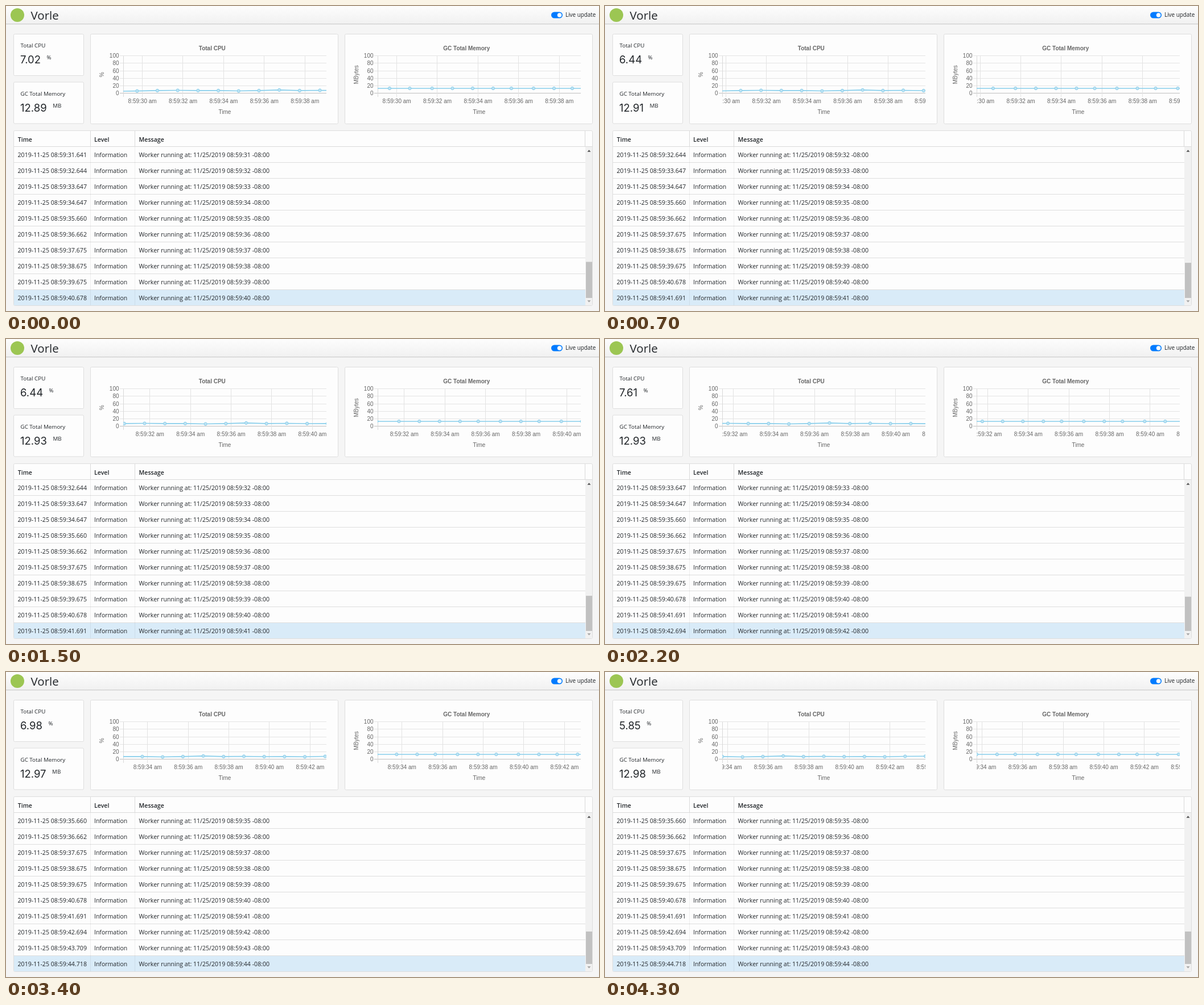
An HTML page with a canvas for the animation above (4400 ms loop, 1042x537 px).

```html
<!DOCTYPE html>
<html lang="en">
<head>
<meta charset="utf-8">
<title>Dashboard</title>
<style>
  html, body { margin: 0; width: 100%; height: 100%; overflow: hidden; background: #f5f5f5; }
  canvas { display: block; }
</style>
</head>
<body>
<canvas id="stage" width="1042" height="537"></canvas>
<script>
const ctx = document.getElementById('stage').getContext('2d');
const LOOP = 4400, STEP = 100;
const UI = '"Open Sans", "Noto Sans", sans-serif';
const CHART = '"Liberation Sans", Arial, sans-serif';

// Chart scroll distance as [time, pixels]
const SCROLL = [[0, 0], [700, 27.5], [1500, 58.2], [2200, 85.7], [2700, 106.3], [3400, 133.6], [4300, 167.1]];
const CPU_TEXT = [[0, '7.02'], [700, '6.44'], [1600, '7.61'], [2500, '7.88'], [3400, '6.98'], [4300, '5.85']];
const MEMORY_TEXT = [[0, '12.89'], [600, '12.91'], [1500, '12.93'], [2500, '12.95'], [3400, '12.97'], [4300, '12.98']];
const LOG_TIMES = [700, 1600, 2500, 3400];
const FIRST_SECOND = 31;
const LOG_MS = [641, 644, 647, 647, 660, 662, 675, 675, 675, 678, 691, 694, 709, 718];

const CPU_POINTS = [5.2, 5.9, 7, 7.6, 7.1, 7.1, 6, 7, 8.6, 7, 7.7, 6.9, 7.02, 6.44, 7.61, 7.88, 6.98]
  .map((value, i) => [194.6 + 35.7 * i, value]);
const MEMORY_POINTS = [638, 674, 709.5, 748.7, 784.5, 820, 856, 888, 927, 963, 995, 1034, 1070, 1102, 1138, 1175, 1210]
  .map(x => [x, 12.9]);

function rect(x, y, w, h, color) {
  ctx.fillStyle = color;
  ctx.fillRect(x, y, w, h);
}

function text(str, x, y, size, { color = '#212529', weight = 400, family = UI, align = 'left' } = {}) {
  ctx.font = `${weight} ${size}px ${family}`;
  ctx.fillStyle = color;
  ctx.textAlign = align;
  ctx.fillText(str, x, y);
  return ctx.measureText(str).width;
}

function chartText(str, x, y, align = 'center', weight = 400) {
  text(str, x, y, 10, { color: '#666', family: CHART, align, weight });
}

function circle(x, y, r, fill) {
  ctx.beginPath();
  ctx.arc(x, y, r, 0, Math.PI * 2);
  ctx.fillStyle = fill;
  ctx.fill();
}

function clipped(x, y, w, h, draw) {
  ctx.save();
  ctx.beginPath();
  ctx.rect(x, y, w, h);
  ctx.clip();
  draw();
  ctx.restore();
}

function card(x, y, w, h) {
  ctx.beginPath();
  ctx.roundRect(x + 0.5, y + 0.5, w - 1, h - 1, 2);
  ctx.fillStyle = '#fdfdfd';
  ctx.fill();
  ctx.strokeStyle = '#dedede';
  ctx.lineWidth = 1;
  ctx.stroke();
}

function scrollAt(t) {
  const i = Math.max(1, SCROLL.findIndex(([time]) => time >= t));
  const [t0, x0] = SCROLL[i - 1], [t1, x1] = SCROLL[i];
  return x0 + (x1 - x0) * (t - t0) / (t1 - t0);
}

const valueAt = (steps, t) => steps.filter(([time]) => time <= t).pop()[1];

function drawHeader() {
  const shade = ctx.createLinearGradient(0, 0, 0, 31);
  shade.addColorStop(0, '#fdfdfd');
  shade.addColorStop(1, '#f1f1f1');
  rect(0, 0, 1042, 31, shade);
  rect(0, 31, 1042, 1, '#cfcfcf');
  rect(0, 32, 1042, 1, '#e9e9e9');
  circle(20, 16, 12, '#9cc653');
  text('Vorle', 43.5, 24, 20.5, { weight: 500 });

  ctx.beginPath();
  ctx.roundRect(958, 10.5, 20, 11, 5.5);
  ctx.fillStyle = '#007bff';
  ctx.fill();
  circle(972.6, 16, 3.8, '#fff');
  text('Live update', 983, 19.3, 9.9);
}

function drawMetric(y, label, value, unit) {
  card(13, y, 124, 74);
  text(label, 25.5, y + 24, 9.8);
  const width = text(value, 25, y + 52, 18.5, { family: 'Inter, sans-serif' });
  text(unit, 25 + width + 10.5, y + 45, 9.8);
}

function drawChart(x, title, unit, points, scroll) {
  const left = x + 58, right = x + 415, top = 88, bottom = 153.5;
  const yOf = value => bottom - value * 0.657;
  card(x, 49, 436, 159);
  chartText(title, x + 214.3, 77.5, 'center', 700);
  chartText('Time', x + 236.5, 189.5);

  ctx.save();
  ctx.translate(x + 20.5, 120.8);
  ctx.rotate(-Math.PI / 2);
  chartText(unit, 0, 3.5);
  ctx.restore();

  for (let value = 0; value <= 100; value += 20) {
    const y = Math.round(yOf(value) - 0.5);
    rect(left - 6, y, right - left + 6, 1, value ? '#e5e5e5' : '#bfbfbf');
    chartText(value, left - 7.5, y + 4, 'right');
  }
  rect(left, top, 1, 72, '#d8d8d8');

  clipped(left, 80, right - left, 95, () => {
    for (let second = 28; second <= 46; second += 2) {
      const tick = x + 91.6 + (second - 30) * 35.7 - scroll;
      if (tick >= left && tick <= right) rect(Math.round(tick - 0.6), top, 1, 72, '#e3e3e3');
      chartText(`8:59:${second} am`, tick, 170.5);
    }
    ctx.beginPath();
    points.forEach(([px, value]) => ctx.lineTo(px - scroll, yOf(value)));
    ctx.strokeStyle = '#87ceeb';
    ctx.lineWidth = 1.6;
    ctx.lineJoin = 'round';
    ctx.stroke();
    ctx.lineWidth = 1;
    for (const [px, value] of points) {
      circle(px - scroll, yOf(value), 2.6, '#bfe3f3');
      ctx.stroke();
    }
  });
}

function drawArrow(y, dir, color) {
  ctx.beginPath();
  ctx.moveTo(1021.5, y + 1.7 * dir);
  ctx.lineTo(1027.5, y + 1.7 * dir);
  ctx.lineTo(1024.5, y - 1.7 * dir);
  ctx.fillStyle = color;
  ctx.fill();
}

function drawTable(added) {
  card(13, 219, 1018, 309);
  rect(14, 247, 1016, 1, '#dadada');
  [['Time', 20.7], ['Level', 155], ['Message', 233.5]]
    .forEach(([label, x]) => text(label, x, 239, 10.6, { weight: 600 }));

  for (let row = 0; row < 10; row++) {
    const y = 248 + row * 28, index = row + added;
    const clock = `08:59:${FIRST_SECOND + index}`;
    if (row === 9) rect(14, y, 1004, 27, '#d9ebf8');
    else rect(14, y + 27, 1004, 1, '#dedede');
    clipped(14, y, 128, 28, () => text(`2019-11-25 ${clock}.${LOG_MS[index]}`, 20.5, y + 18, 10.65));
    text('Information', 155, y + 18, 10.5);
    text(`Worker running at: 11/25/2019 ${clock} -08:00`, 233.5, y + 18, 10.6);
  }
  for (const x of [148, 226]) {
    rect(x, 220, 1, 28, '#dadada');
    rect(x, 248, 1, 279, 'rgba(0,0,0,.06)');
  }
  rect(1017, 220, 1, 28, '#dadada');

  rect(1018, 248, 12, 279, '#f1f1f1');
  const thumb = 450.5 + added * 1.6;
  rect(1019, thumb, 11, 514 - thumb, '#c1c1c1');
  drawArrow(255, 1, '#505050');
  drawArrow(520, -1, '#a3a3a3');
}

function draw(t) {
  const scroll = scrollAt(t);
  rect(0, 0, 1042, 537, '#f5f5f5');
  drawHeader();
  drawMetric(49, 'Total CPU', valueAt(CPU_TEXT, t), '%');
  drawMetric(133.5, 'GC Total Memory', valueAt(MEMORY_TEXT, t), 'MB');
  drawChart(148, 'Total CPU', '%', CPU_POINTS, scroll);
  drawChart(595, 'GC Total Memory', 'MBytes', MEMORY_POINTS, scroll);
  drawTable(LOG_TIMES.filter(time => time <= t).length);
}

const start = performance.now();
function tick() {
  const elapsed = (performance.now() - start) % LOOP;
  draw(Math.floor(elapsed / STEP) * STEP);
  requestAnimationFrame(tick);
}
tick();
</script>
</body>
</html>
```
